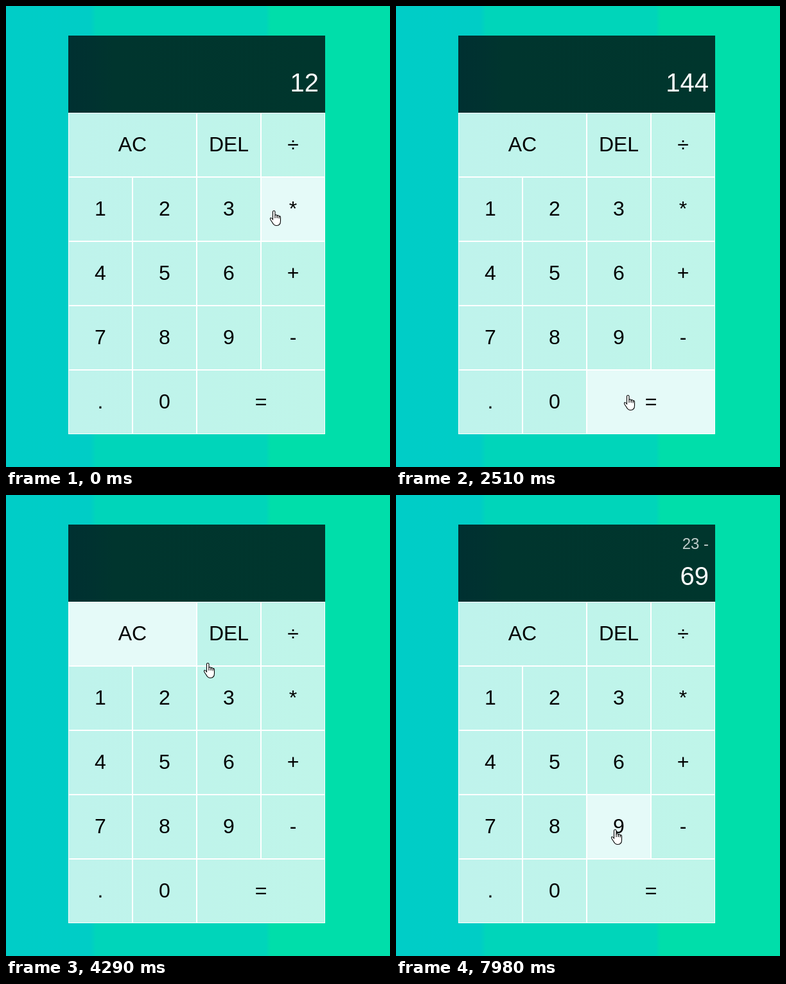
Recreate the animation shown at these times as an HTML page with a canvas. Size 598 px wide and 717 px high, loop 8000 ms.

```html
<!DOCTYPE html>
<html lang="en">
<head>
<meta charset="utf-8">
<title>Calculator</title>
<style>
  html, body { margin: 0; width: 100%; height: 100%; overflow: hidden; }
  canvas { display: block; }
</style>
</head>
<body>
<canvas id="stage" width="598" height="717"></canvas>
<script>
const ctx = document.getElementById("stage").getContext("2d");
const LOOP = 8000, LEFT = 97, TOP = 166, CELL = 100, RIGHT = 487;
const FONT = '"Liberation Sans", Arial, sans-serif';

// Keypad: label, column, row, columns spanned
const keys = [
  ["AC", 0, 0, 2], ["DEL", 2, 0, 1], ["÷", 3, 0, 1],
  ...["123*", "456+", "789-"].flatMap((line, r) =>
    [...line].map((label, c) => [label, c, r + 1, 1])),
  [".", 0, 4, 1], ["0", 1, 4, 1], ["=", 2, 4, 2]
].map(([label, c, r, span]) =>
  ({ label, x: LEFT + c * CELL, y: TOP + r * CELL, w: span * CELL }));

const keyAt = ({ x, y }) => keys.find(k =>
  x >= k.x && x < k.x + k.w && y >= k.y && y < k.y + CELL);

const steps = [{ t: 0, x: 417, y: 318, expr: "", num: "12" }];
const last = () => steps[steps.length - 1];
const step = (t, change) => steps.push({ ...last(), t, ...change });
const move = (t, x, y) => step(t, { x, y });
const show = (t, expr, num) => step(t, { expr, num });

// Eased quadratic path from the current spot to (x, y), bent towards (cx, cy)
function glide(times, x, y, cx, cy) {
  const a = last();
  times.forEach((t, i) => {
    const u = (i + 1) / times.length, s = u * u * (3 - 2 * u);
    const mix = (p, c, q) => (1 - s) ** 2 * p + 2 * s * (1 - s) * c + s * s * q;
    move(t, mix(a.x, cx, x), mix(a.y, cy, y));
  });
}

// 12 * 12 = 144
move(140, 428, 322);
show(290, "12 *", "");
glide([440, 600, 760, 920], 165, 348, 300, 340);
show(1080, "12 *", "1");
move(1210, 240, 352);
show(1360, "12 *", "12");
move(1510, 258, 410);
move(1660, 304, 470);
move(1810, 345, 545);
move(1960, 356, 596);
move(2090, 359, 604);
show(2210, "", "144");
// clear
move(2510, 361, 605);
glide([2660, 2790, 2930, 3070, 3200, 3330, 3470], 274, 230, 322, 418);
show(3620, "", "");
// 23 -
glide([4020, 4160, 4310, 4450, 4600, 4740], 265, 350, 380, 290);
show(5020, "", "2");
move(5150, 335, 352);
step(5280, { x: 350, y: 352, num: "23" });
move(5410, 381, 371);
move(5560, 391, 432);
move(5700, 393, 472);
move(5850, 418, 460);
move(5990, 436, 490);
move(6110, 442, 504);
move(6540, 443, 506);
move(6690, 443, 507);
show(6810, "23 -", "");
// 69
glide([6940, 7070, 7200, 7340], 347, 438, 395, 465);
show(7470, "23 -", "6");
move(7740, 345, 470);
move(7860, 342, 512);
step(7980, { x: 341, y: 520, num: "69" });

// Hover trails the pointer by one step
steps.forEach((s, i) => { s.hover = keyAt(steps[Math.max(0, i - 1)]); });

function ramp(x0, x1, stops) {
  const g = ctx.createLinearGradient(x0, 0, x1, 0);
  stops.forEach(([at, color]) => g.addColorStop((at - x0) / (x1 - x0), color));
  return g;
}
const backdrop = ramp(0, 598, [
  [0, "#00cdc7"], [132, "#00cdc6"], [140, "#00d5ba"],
  [405, "#00d5ba"], [412, "#00deaa"], [598, "#00deaa"]]);
const screen = ramp(97, 497, [
  [97, "#003031"], [134, "#003230"], [166, "#00352e"], [497, "#00362d"]]);
const keyFill = ramp(97, 497, [[97, "#bff3ec"], [497, "#bff5e9"]]);

const hand = new Path2D(
  "M-1.5 14V2Q-1.5 .5 .3 .5Q2 .5 2 2V8Q2 6.8 3.5 6.8Q5 6.8 5.2 8.3" +
  "Q5.4 7.5 6.6 7.5Q8 7.6 8.2 9.3Q8.6 8.7 9.5 8.9Q10.5 9.2 10.5 11V16.5" +
  "Q10.5 23.5 4.5 23.5Q0 23.5 -2 19L-5 14.5Q-6 12.5 -5 11.6Q-3.8 11 -1.5 14Z");
const knuckles = new Path2D("M2 7.5V12M5.2 8.3V12M8.2 9.3V12.5");

function box(color, x, y, w, h) {
  ctx.fillStyle = color;
  ctx.fillRect(x, y, w, h);
}

function text(str, x, y, size, color, align) {
  ctx.font = `${size}px ${FONT}`;
  ctx.textAlign = align;
  ctx.fillStyle = color;
  ctx.fillText(str, x, y);
}

function drawKey(k, hovered) {
  box("#fff", k.x, k.y, k.w, CELL);
  box(hovered ? "#e5faf8" : keyFill, k.x + 1, k.y + 1, k.w - 2, CELL - 2);
  text(k.label, k.x + k.w / 2, k.y + 60, 32, "#000", "center");
}

function drawHand(x, y) {
  ctx.save();
  ctx.translate(x, y);
  ctx.fillStyle = "#fff";
  ctx.strokeStyle = "#000";
  ctx.lineWidth = 1.1;
  ctx.fill(hand);
  ctx.stroke(hand);
  ctx.stroke(knuckles);
  ctx.restore();
}

function draw(t) {
  const s = steps.findLast(p => p.t <= t);
  box(backdrop, 0, 0, 598, 717);
  box(screen, LEFT, 46, 400, 120);
  // Both lines share the free height, so each shifts when the other is empty
  text(s.expr, RIGHT, s.num ? 84 : 96, 24, "rgba(255,255,255,.75)", "right");
  text(s.num, RIGHT, s.expr ? 140 : 133, 40, "#fff", "right");
  keys.forEach(k => drawKey(k, k === s.hover));
  drawHand(Math.round(s.x), Math.round(s.y));
}

const start = performance.now();
function frame() {
  draw((performance.now() - start) % LOOP);
  requestAnimationFrame(frame);
}
frame();
</script>
</body>
</html>
```
